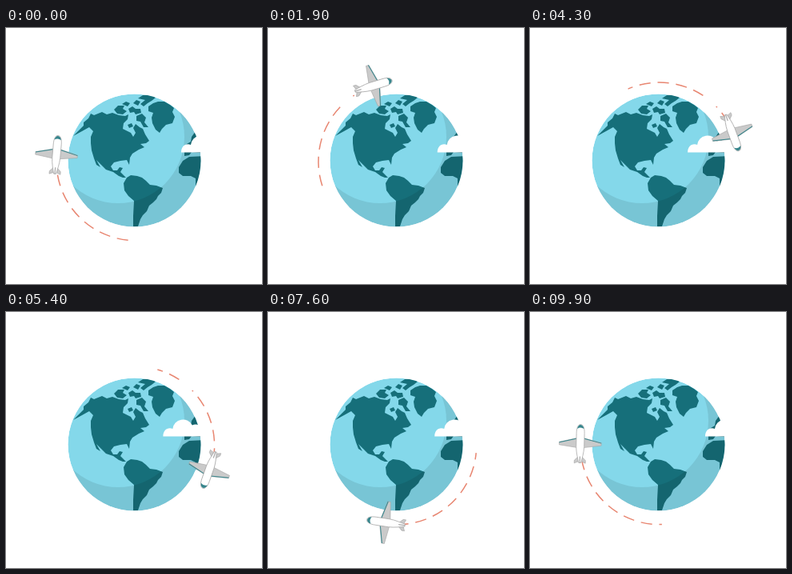
Write an HTML page that moves like this. It is 320 px wide and 320 px high and loops after 10000 ms.

```html
<!DOCTYPE html>
<html lang="en">
<head>
<meta charset="utf-8">
<title>Plane around the globe</title>
<style>
  html, body { margin: 0; width: 100%; height: 100%; overflow: hidden; background: #fff; }
  svg { display: block; width: 100vw; height: 100vh; }
</style>
</head>
<body>
<svg viewBox="0 0 320 320">
  <defs>
    <clipPath id="disc"><circle cx="160.5" cy="165.5" r="83"/></clipPath>
    <mask id="crescent">
      <rect width="320" height="320" fill="#fff"/>
      <circle cx="140" cy="136" r="83" fill="#000"/>
    </mask>
  </defs>
  <g clip-path="url(#disc)">
    <circle cx="160.5" cy="165.5" r="83" fill="#84d8ea"/>
    <g fill="#166f7a">
      <!-- North America -->
      <path d="M84 135L90 129L97 122L97 118L103 113L106 107L110 109L120 105L126 108L133 106L141 109L149 110L153 108L152 114L147 119L146 126L152 129L156 131L159 136L162 131L159 125L162 120L167 124L171 126L174 133L179 141L175 144L168 145L173 149L166 152L158 157L155 162L154 171L151 165L143 166L135 168L131 173L134 178L139 178L142 174L146 175L143 180L147 184L150 187L146 187L141 185L134 180L125 177L119 171L113 165L118 174L113 171L110 163L107 153L106 144L106 136L109 129L104 124L95 129Z"/>
      <!-- Arctic islands -->
      <path d="M135 102L140 97L148 97L146 101L151 104L146 108L139 107Z"/>
      <path d="M145 95L150 92L155 94L152 98Z"/>
      <path d="M153 101L158 98L162 101L168 101L169 106L162 108L160 105L155 106Z"/>
      <path d="M159 94L163 90L168 92L165 97Z"/>
      <path d="M163 110L170 107L175 112L173 118L178 124L172 124L168 117L163 116Z"/>
      <path d="M165 88L171 84L181 83L187 87L182 91L177 94L172 98L168 95L174 90Z"/>
      <path d="M152 121L157 119L159 123L154 125Z"/>
      <!-- Greenland -->
      <path d="M178 98L184 94L190 92L198 92L205 96L210 100L208 105L211 111L208 119L200 121L195 126L192 131L187 127L183 119L182 112L184 106L178 104Z"/>
      <!-- South America -->
      <path d="M147 194L151 187L156 184L164 185L170 187L175 191L180 196L188 197L196 200L194 206L190 210L188 214L184 218L179 222L176 229L171 234L168 239L165 248L159 248L159 235L160 216L153 210L148 203Z"/>
      <!-- Europe and Africa -->
      <path d="M237 129L250 138L250 157L232 155L229 159L223 160L223 155L227 153L224 149L226 145L231 142L232 136Z"/>
      <path d="M216 174L221 166L229 161L250 160L250 198L237 198L237 188L231 185L221 185L216 181Z"/>
    </g>
    <rect width="320" height="320" fill="#000" opacity=".085" mask="url(#crescent)"/>
  </g>
  <path id="cloud" fill="#fff" d="M0 155.4C0 148 5.5 143.5 12 146A13 13 0 0 1 36.5 141.5C44.5 137.5 51 146 51 155.4Z"/>
  <path id="trail" fill="none" stroke="#e88671" stroke-width="1.5"/>
  <g id="plane">
    <g id="side">
      <path d="M4 -6L26.3 -.5V3L4 6Z" fill="#cacaca" stroke="#a5a5a5" stroke-width=".6"/>
      <path d="M4 -5.5L26.3 0" stroke="#36858c" stroke-width="1"/>
      <path d="M2 17L7 22V25.5L1 23Z" fill="#cacaca" stroke="#a5a5a5" stroke-width=".6"/>
    </g>
    <use href="#side" transform="scale(-1 1)"/>
    <path d="M0 -23C3.5 -23 5 -18 5 -12V5C4.7 13 2.8 19 1.5 25H-1.5C-2.8 19 -4.7 13 -5 5V-12C-5 -18 -3.5 -23 0 -23Z" fill="#fff" stroke="#aaa" stroke-width=".8"/>
    <path d="M-4.2 -17.5C-3.6 -20.5 -2 -22.5 0 -22.5S3.6 -20.5 4.2 -17.5Q0 -20.5 -4.2 -17.5Z" fill="#36858c"/>
    <path d="M0 17V25.5" stroke="#aaa" stroke-width="1.2"/>
  </g>
</svg>
<script>
const LOOP = 10000, STEP = 100;
const ROUTE = { x: 161.8, y: 166.8, r: 98.8 };
const FLIGHT = { x: 161, y: 165.9, r: 98.2 };
const PITCH = 360 / 27, DASH = 8.2, FIRST = 62;
const STUBS = [-1, 5];
const [cloud, trail, plane] = ['cloud', 'trail', 'plane'].map(id => document.getElementById(id));

// Angles run clockwise in degrees, starting at the left of the circle.
function point({ x, y, r }, angle) {
  const a = angle * Math.PI / 180;
  return `${(x - r * Math.cos(a)).toFixed(2)} ${(y - r * Math.sin(a)).toFixed(2)}`;
}

// Dashes stay in place; only those inside the window behind the plane show.
function trailPath(tail, head) {
  let d = '';
  for (let n = -12; n <= 23; n++) {
    const start = FIRST + n * PITCH, end = start + DASH;
    const from = Math.max(STUBS.includes(n) ? end - 1 : start, tail);
    const to = Math.min(end, head);
    if (to > from) d += `M${point(ROUTE, from)}A${ROUTE.r} ${ROUTE.r} 0 0 1 ${point(ROUTE, to)}`;
  }
  return d;
}

function draw(time) {
  const turn = Math.floor(time % LOOP / STEP) * STEP / LOOP;
  const angle = 5 + 360 * turn;
  plane.setAttribute('transform', `translate(${point(FLIGHT, angle)}) rotate(${angle})`);
  trail.setAttribute('d', trailPath(angle - 93.2, angle - 10));
  cloud.setAttribute('transform', `translate(${207.5 + 11.5 * Math.cos(2 * Math.PI * turn)} 0)`);
}

const begin = performance.now();
function tick() {
  draw(performance.now() - begin);
  requestAnimationFrame(tick);
}
tick();
</script>
</body>
</html>
```
